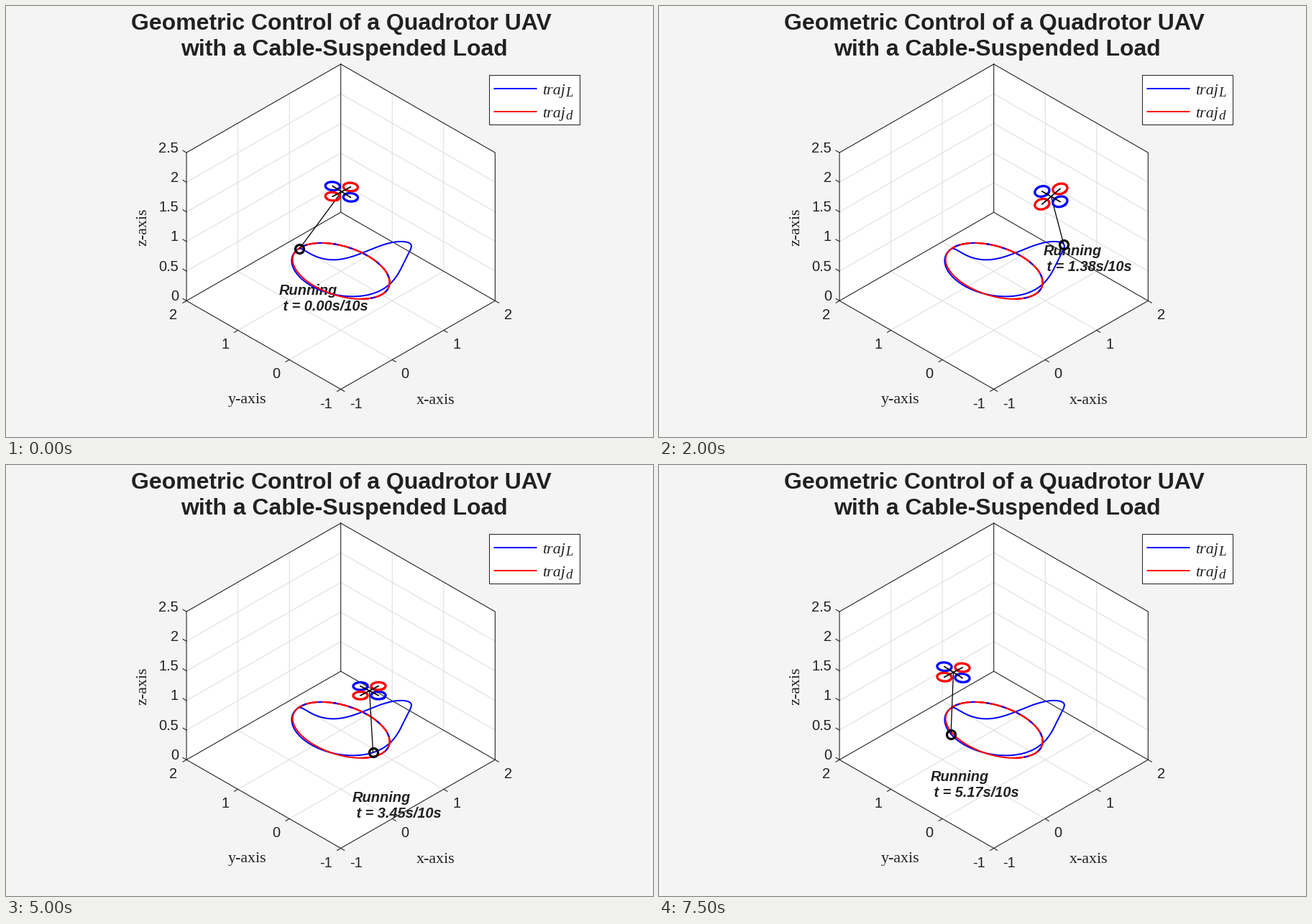
Animation of 900x600 px, one loop 8 s. Source, as a matplotlib script:

```python
import numpy as np
import matplotlib.pyplot as plt
from matplotlib.animation import FuncAnimation
from matplotlib.patches import Rectangle

DPI = 100
PT = 72 / DPI  # points per pixel
INK = "#212121"
GRID = "#dcdcdc"
FRAMES = 16
STEP = 10 / 29  # simulated seconds per frame

plt.rcParams["path.snap"] = False
fig = plt.figure(figsize=(9, 6), dpi=DPI, facecolor="#f4f4f4")
ax = fig.add_axes([0, 0, 1, 1])
ax.set_xlim(-0.5, 899.5)
ax.set_ylim(599.5, -0.5)
ax.axis("off")


def line(pts, color, width, z, **kw):
    xs, ys = np.asarray(pts, float).T
    return ax.plot(xs, ys, color=color, lw=width * PT, zorder=z, **kw)[0]


def label(x, y, text, size, ha="center", family="Liberation Sans", z=3, **kw):
    kw.setdefault("va", "baseline")
    return ax.text(x, y, text, fontsize=size * PT, ha=ha, family=family,
                   color=INK, zorder=z, **kw)


def project(x, y, z):
    """Isometric view of the box [-1, 2] x [-1, 2] x [0, 2.5]."""
    u, v = x + 1, y + 1
    return 465.2 + 71.55 * (u - v), 533 - 41.05 * (u + v) - 82.5 * z


def bump(k, centre, width):
    return np.exp(-0.5 * ((k - centre) / width) ** 2)


def surge(k, peak, power):
    """Fast rise to 1 at the peak, then a slower fall."""
    r = k / peak
    return (r * np.exp(1 - r)) ** power


def desired(k):
    th = np.radians(149) - k * STEP
    return np.array([465.7 + 67.5 * np.cos(th),
                     368.4 + 39 * np.cos(th + np.radians(66))])


def load_at(k):
    """Desired path plus a tracking error that dies out."""
    ex = 80 * surge(k, 3.3, 4.2) - 5 * bump(k, 13, 2.2)
    ey = 26.5 * bump(k, 1.45, 0.65) - 12.5 * bump(k, 6.3, 3)
    return desired(k) + np.array([ex, ey])


def quad_at(k):
    """The cable swings as a damped pendulum about its steady lean."""
    lx, ly = load_at(k)
    dx = 0.06 * (466 - lx) + 55 * np.exp(-0.31 * k) * np.cos(0.97 * k)
    dy = (27 * bump(k, 3, 1.2) - 14 * bump(k, 1, 0.4)
          - np.sqrt(86**2 - 0.3 * dx**2))
    return np.array([lx + dx, ly + dy])


def arms_at(k):
    blue = 7 + 0.9 * np.cos(0.45 * (k - 1))
    red = 6.6 + 4.1 * bump(k, 4, 1.3) - 2.85 * bump(k, 2, 0.7)
    return np.array([12.5, blue]), np.array([12.5, -red])


def text_base(k):
    return (446 + 51 * np.cos((k - 11.4) * STEP)
            - 35 * bump(k, 3.8, 1.35) + 21 * bump(k, 0.5, 0.6))


def draw_box():
    outline = [project(*c) for c in ((2, 2, 2.5), (2, -1, 2.5), (2, -1, 0),
                                     (-1, -1, 0), (-1, 2, 0), (-1, 2, 2.5))]
    ax.fill(*zip(*outline), color="white", lw=0, zorder=0)
    for c in (0, 1):
        line([project(c, -1, 0), project(c, 2, 0), project(c, 2, 2.5)],
             GRID, 1, 1)
        line([project(-1, c, 0), project(2, c, 0), project(2, c, 2.5)],
             GRID, 1, 1)
    for z in (0.5, 1, 1.5, 2):
        line([project(-1, 2, z), project(2, 2, z), project(2, -1, z)],
             GRID, 1, 1)
    line(outline + outline[:1], INK, 1.1, 2)
    for c in ((2, 2, 2.5), (-1, 2, 0), (2, -1, 0)):
        line([project(2, 2, 0), project(*c)], INK, 1.1, 2)


def draw_ticks():
    for c in (-1, 0, 1, 2):
        for side, (x, y) in ((1, project(c, -1, 0)), (-1, project(-1, c, 0))):
            line([(x, y), (x + 5 * side, y + 2.9)], INK, 1.1, 2)
            label(x + side * (21 if c < 0 else 18), y + 26, str(c), 20)
    for z in np.arange(0, 2.6, 0.5):
        x, y = project(-1, 2, z)
        line([(x, y), (x - 5, y - 2.9)], INK, 1.1, 2)
        label(239.5, y - 0.5, f"{z:g}", 20, ha="right")
    serif = dict(size=22, family="Liberation Serif")
    label(335.5, 553, "y-axis", **serif)
    label(597.5, 553, "x-axis", **serif)
    label(199.5, 307, "z-axis", rotation=90, va="center", ha="right", **serif)


def draw_legend():
    ax.add_patch(Rectangle((672, 96), 126, 69, fc="white", ec=INK,
                           lw=PT, zorder=8))
    for y, color, sub in ((114.5, "blue", "L"), (146.5, "red", "d")):
        line([(678, y), (738, y)], color, 2, 9, solid_capstyle="butt")
        font = dict(ha="left", family="Liberation Serif", style="italic", z=9)
        label(745.5, y + 7.5, "traj", 22, **font)
        label(778, y + 11, sub, 19, **font)


draw_box()
draw_ticks()
draw_legend()
label(466, 33, "Geometric Control of a Quadrotor UAV", 32, weight="bold")
label(470.3, 69, "with a Cable-Suspended Load", 32, weight="bold")

run = np.linspace(0, 29, 800)
line(load_at(run).T, "blue", 2, 4)
line(desired(run).T, "red", 2, 5)
# Second lap, where both paths blend into one another
line(desired(run[run > 18.5]).T, "blue", 2, 5.1,
     dashes=(3, 8), dash_capstyle="butt")

status = dict(size=20, ha="left", weight="bold", style="italic", z=3.5)
running = label(0, 0, "Running", **status)
clock = label(0, 0, "", **status)

blank = [(0, 0)]
cable = line(blank, "black", 1.3, 6)
load = line(blank, "black", 1, 7, marker="o", ms=12 * PT, mfc="none",
            mec="black", mew=3.2 * PT)
rotors = [line(blank, c, 3.3, 6.2) for c in ("blue", "blue", "red", "red")]
arms = [line(blank, "black", 1.7, 6.4) for _ in range(2)]
ring = np.linspace(0, 2 * np.pi, 49)


def update(k):
    lx, ly = load_at(k)
    centre = quad_at(k)
    u, v = arms_at(k)
    circle = 0.57 * (np.outer(np.cos(ring), u) + np.outer(np.sin(ring), v))
    for rotor, arm in zip(rotors, (-u, u, v, -v)):
        rotor.set_data(*(centre + arm + circle).T)
    for item, arm in zip(arms, (u, v)):
        item.set_data(*np.array([centre - arm, centre + arm]).T)
    cable.set_data([centre[0], lx], [centre[1], ly])
    load.set_data([lx], [ly])
    base = text_base(k) - 0.5
    running.set_position((lx - 28.7, base - 22))
    clock.set_position((lx - 28.7, base))
    clock.set_text(f" t = {k * STEP:.2f}s/10s")
    return [running, clock, cable, load, *rotors, *arms]


anim = FuncAnimation(fig, update, frames=FRAMES, interval=500,
                     repeat=True, repeat_delay=0, blit=False)
plt.show()
```
